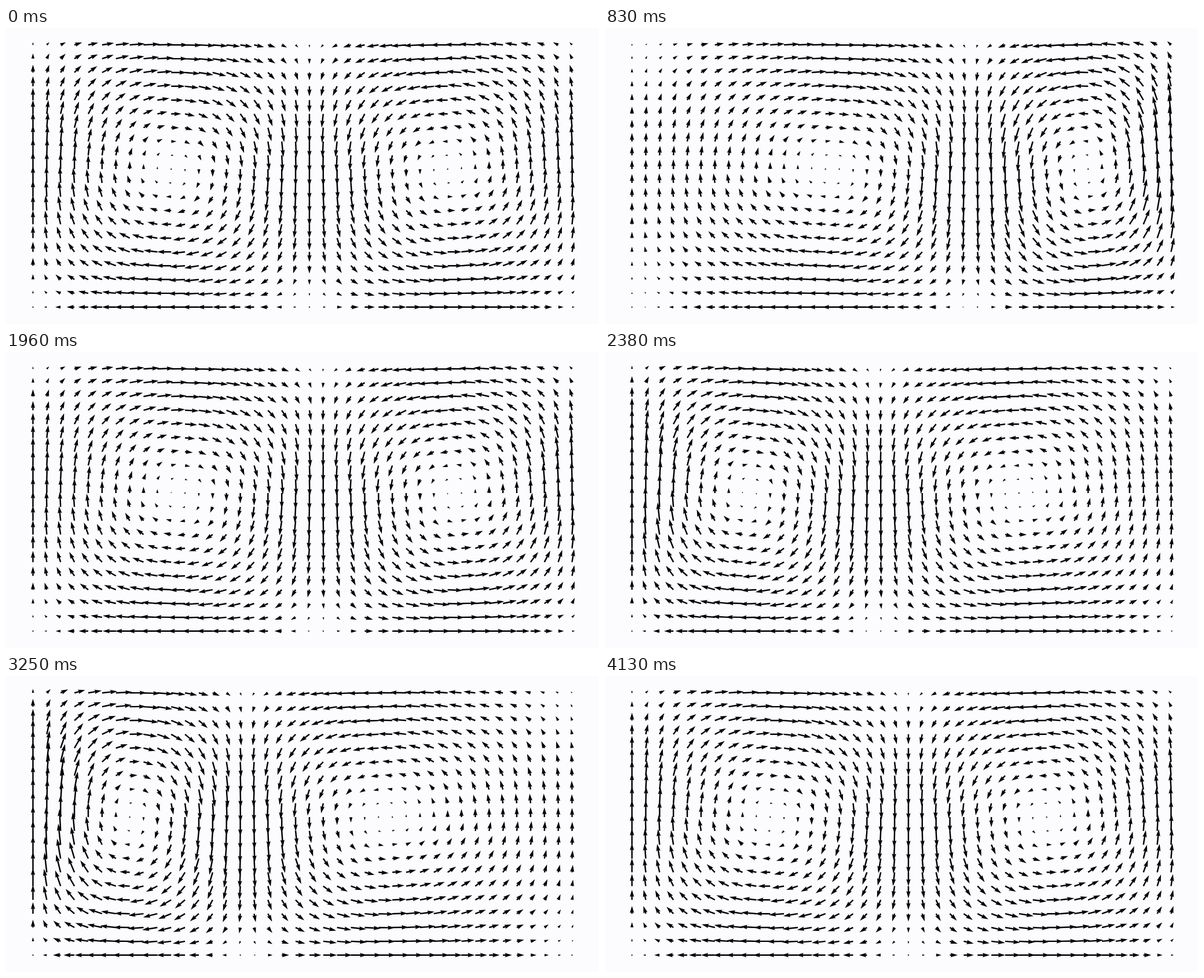
An HTML page for the animation above (4180 ms loop, 1024x512 px).

```html
<!DOCTYPE html>
<html lang="en">
<head>
<meta charset="utf-8">
<title>Double gyre</title>
<style>
  html, body { margin: 0; width: 100%; height: 100%; overflow: hidden; background: #fcfcff; }
  svg { display: block; width: 100%; height: 100%; }
</style>
</head>
<body>
<svg viewBox="0 0 1024 512"><path id="field" fill="#000"/></svg>
<script>
const field = document.getElementById('field');
const COLS = 40, ROWS = 20, STEP = 0.05;
const UNIT = 1024 / 2.145;                // pixels per unit of the flow domain
const LEFT = 0.0975 * UNIT;
const BOTTOM = 256 + 0.475 * UNIT;
const SPEED = 29.68;                      // arrow pixels per unit of velocity
const WIDTH = 0.0024 * 1024;              // shaft width
const HEAD = 5, BARB = 4.5, HALF_HEAD = 1.5;
const LOOP = 4180, STEPS = 99, EPS = 0.25;

// Time-dependent double gyre
function velocity(x, y, a) {
  const f = a * x * x + (1 - 2 * a) * x;
  const slope = 2 * a * x + 1 - 2 * a;
  return [
    -Math.sin(Math.PI * f) * Math.cos(Math.PI * y),
    Math.cos(Math.PI * f) * Math.sin(Math.PI * y) * slope
  ];
}

// Arrow outline along +x, in shaft widths
function outline(length) {
  if (length < 1) {
    return Array.from({ length: 6 }, (_, i) =>
      [Math.cos(i * Math.PI / 3) / 2, Math.sin(i * Math.PI / 3) / 2]);
  }
  const k = Math.min(1, length / HEAD);
  const upper = [
    [0, k / 2],
    [length - BARB * k, k / 2],
    [length - HEAD * k, HALF_HEAD * k]
  ];
  const lower = upper.map(([x, y]) => [x, -y]).reverse();
  return [...upper, [length, 0], ...lower];
}

function arrow(px, py, u, v) {
  const speed = Math.hypot(u, v);
  const c = speed ? u / speed : 1, s = speed ? v / speed : 0;
  const points = outline(speed * SPEED / WIDTH).map(([x, y]) =>
    (px + (x * c - y * s) * WIDTH).toFixed(2) + ' ' +
    (py - (x * s + y * c) * WIDTH).toFixed(2));
  return 'M' + points.join('L') + 'Z';
}

function draw(step) {
  const a = EPS * Math.sin(2 * Math.PI * step / STEPS);
  let d = '';
  for (let j = 0; j < ROWS; j++) {
    for (let i = 0; i < COLS; i++) {
      const x = i * STEP, y = j * STEP;
      d += arrow(LEFT + x * UNIT, BOTTOM - y * UNIT, ...velocity(x, y, a));
    }
  }
  field.setAttribute('d', d);
}

// 24 steps per second, rounded to hundredths of a second
function stepAt(ms) {
  const ticks = Math.floor((ms % LOOP) / 10);
  return Math.min(STEPS, Math.floor((6 * ticks + 2) / 25));
}

let shown = 0;
const start = performance.now();
function tick() {
  const step = stepAt(performance.now() - start);
  if (step !== shown) draw(shown = step);
  requestAnimationFrame(tick);
}
draw(0);
requestAnimationFrame(tick);
</script>
</body>
</html>
```
